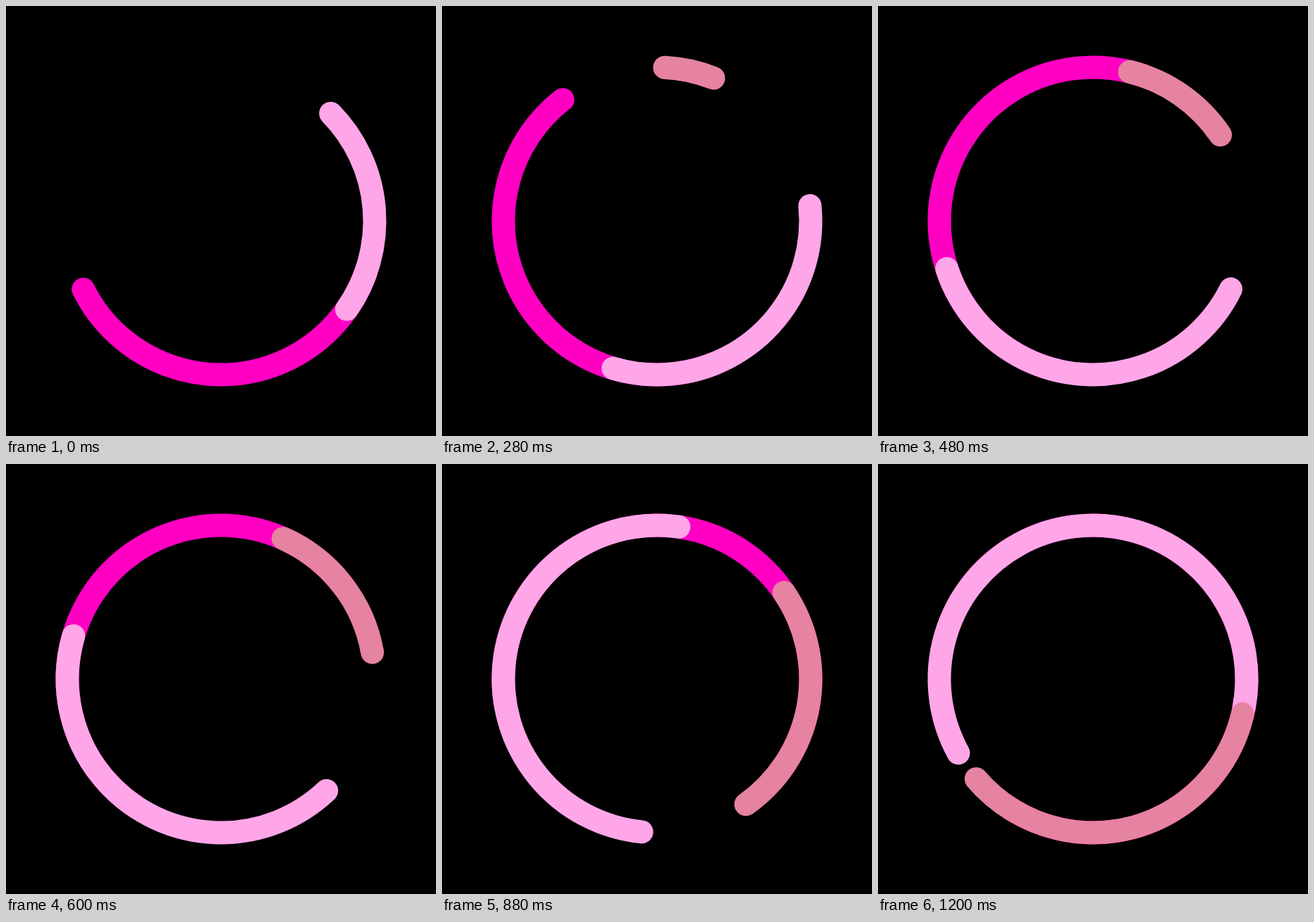
An HTML page with a canvas for the animation above (1.24 s loop, 610x610 px).

```html
<!DOCTYPE html>
<html>
<head>
<meta charset="utf-8">
<style>
  html, body { margin: 0; width: 100%; height: 100%; overflow: hidden; background: #000; }
  canvas { display: block; }
</style>
</head>
<body>
<canvas id="stage" width="610" height="610"></canvas>
<script>
  const ctx = document.getElementById('stage').getContext('2d');
  const LOOP = 1240, STEP = 40, TURN = 3055;

  // age: ms since the arc was born at loop start; length in degrees, growth in degrees per ms
  const arcs = [
    { color: '#ff00c3', age: 1120, length: 133.9, growth: 0.1098 },
    { color: '#ffa6e8', age: 680, length: 79.5, growth: 0.11695 },
    { color: '#e583a1', age: -120, length: -14.03, growth: 0.11695 }
  ];

  const smooth = x => x * x * (3 - 2 * x);
  const radians = degrees => (degrees - 90) * Math.PI / 180;

  function draw(time) {
    ctx.fillStyle = '#000';
    ctx.fillRect(0, 0, 610, 610);
    ctx.lineWidth = 33;
    ctx.lineCap = 'round';
    for (const { color, age, length, growth } of arcs) {
      const sweep = length + growth * time;
      if (sweep <= 0.1) continue;
      const tail = 360 * smooth((age + time) / TURN);
      ctx.strokeStyle = color;
      ctx.beginPath();
      ctx.arc(305, 305, 218, radians(tail), radians(tail + sweep));
      ctx.stroke();
    }
  }

  const start = performance.now();
  function tick() {
    const time = (performance.now() - start) % LOOP;
    draw(Math.floor(time / STEP) * STEP);
    requestAnimationFrame(tick);
  }
  tick();
</script>
</body>
</html>
```
